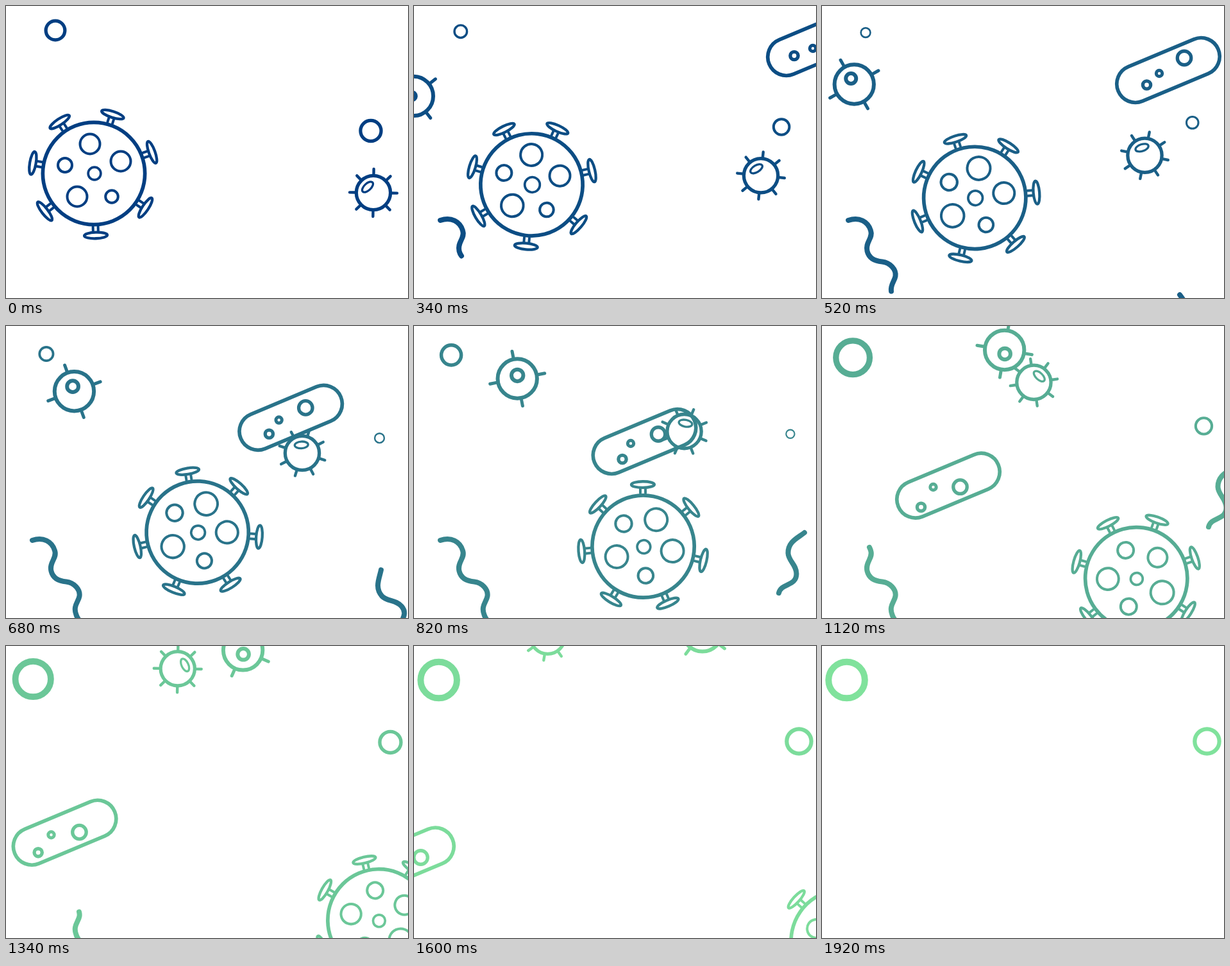
Animation of 627 by 455 pixels, one loop 2000 ms. Source, as an HTML page with a canvas:

```html
<!DOCTYPE html>
<html lang="en">
<head>
<meta charset="utf-8">
<title>Drifting microbes</title>
<style>
html, body { margin: 0; width: 627px; height: 455px; overflow: hidden; background: #fff; }
canvas { display: block; }
</style>
</head>
<body>
<canvas id="stage" width="627" height="455"></canvas>
<script>
const ctx = document.getElementById('stage').getContext('2d');
const RAD = Math.PI / 180;
const KEYS = [0, 340, 520, 820, 1120, 1600, 1920];
let t = 0;

// Eased progress from 0 to 1 over a duration
function ease(duration) {
  const s = Math.min(t / duration, 1);
  return s * s * (3 - 2 * s);
}

const mix = (a, b, p) => a + (b - a) * p;

// Monotone cubic through values at KEYS; the last value is held
function key(...v) {
  const at = i => v[Math.min(i, v.length - 1)];
  const rise = i => (at(i + 1) - at(i)) / (KEYS[i + 1] - KEYS[i]);
  const slope = i => {
    if (i === 0 || i === KEYS.length - 1) return 0;
    const a = rise(i - 1), b = rise(i);
    return a * b <= 0 ? 0 : 2 * a * b / (a + b);
  };
  let i = 0;
  while (i < KEYS.length - 2 && t >= KEYS[i + 1]) i++;
  const h = KEYS[i + 1] - KEYS[i], s = (t - KEYS[i]) / h, r = 1 - s;
  return at(i) * r * r * (1 + 2 * s) + at(i + 1) * s * s * (3 - 2 * s)
    + h * s * r * (slope(i) * r - slope(i + 1) * s);
}

function group(x, y, deg, draw) {
  ctx.save();
  ctx.translate(x, y);
  ctx.rotate(deg * RAD);
  draw();
  ctx.restore();
}

function ellipse(x, y, rx, ry, width, tilt = 0) {
  ctx.lineWidth = width;
  ctx.beginPath();
  ctx.ellipse(x, y, rx, ry, tilt * RAD, 0, 2 * Math.PI);
  ctx.stroke();
}

// Circle measured by its outer edge
const ring = (x, y, outer, width) =>
  ellipse(x, y, outer - width / 2, outer - width / 2, width);

function line(x1, y1, x2, y2, width) {
  ctx.lineWidth = width;
  ctx.beginPath();
  ctx.moveTo(x1, y1);
  ctx.lineTo(x2, y2);
  ctx.stroke();
}

function spikes(count, from, to, width) {
  for (let i = 0; i < count; i++)
    group(0, 0, i * 360 / count, () => line(from, 0, to, 0, width));
}

function bigVirus() {
  const p = ease(1960);
  group(137 + 582.5 * p, 261 + 218 * p, 87.5 * p, () => {
    ring(0, 0, 82.5, 5.7);
    for (const a of [33.5, 88.2, 142.5, 189.7, 236.5, 287.7, 339.9])
      group(0, 0, a, () => {
        line(83, -4, 90, -4, 4);
        line(83, 4, 90, 4, 4);
        ellipse(96.5, 0, 4.8, 18, 4.3);
      });
    ring(-6, -46, key(17.5, 19, 20, 19.5, 17), 4);
    ring(42, -19, key(17.5, 18, 18.5, 19.5, 20), 4);
    ring(-45, -13, key(13, 14, 14.7, 14.7, 14.5), 4);
    ring(1, 0, key(11.7, 13.7, 13.2, 12.2, 11.3), 3.7);
    ring(-26, 36, key(17.5, 19.3, 19.8, 19.5, 18.9, 16.5), 4);
    ring(28, 36, key(11.8, 12.8, 13.3, 13.8, 14.5), 4);
  });
}

function smallVirus() {
  const p = ease(1960);
  group(573 - 400 * p, 291 - 335 * p, 0, () => {
    ring(0, 0, 29.3, 5.3);
    group(0, 0, 1 + 59 * p, () => spikes(8, 29, 37, 4.4));
    group(0, 0, 142 * p, () => ellipse(-9, -9, 10.5, 5.3, 3.3, -43));
  });
}

function eyedVirus() {
  const p = ease(1960);
  group(-44 + 542 * p, 156 - 195.5 * p, 0, () => {
    ring(0, 0, 33.7, 6);
    group(0, 0, -45 + 90 * p, () => spikes(4, 34, 43.3, 5));
    ring(key(-2, -2.5, -5, 0, 0.5), key(4, 0, -9, -5, 6), key(8, 9, 11, 12.2, 11.8), 6);
  });
}

function capsule() {
  const x = key(734, 632, 540, 359.5, 197, -18, -120);
  const y = key(12, 58, 100, 180, 248.7, 333.5, 373);
  group(x, y, 0, () => {
    group(0, 0, -22.7, () => {
      ctx.lineWidth = 5.7;
      ctx.beginPath();
      ctx.roundRect(-84.5, -29, 169, 58, 29);
      ctx.stroke();
    });
    ring(key(28, 27, 25, 21.5, 18.5, 28.5), key(-23, -22, -19, -11.5, 2, -4), 13.4, 5.3);
    ring(key(-8, -10, -14, -21.5, -23.5, -18), key(9, 8, 5, 3, 2.3, 5), 7.2, 5);
    ring(key(-40, -39, -33.5, -34.5, -42.5, -40), key(18, 19.5, 23, 27.5, 33.5, 28), 8.8, 5.4);
  });
}

function bubbles() {
  const a = ease(1660), b = ease(1500);
  const left = key(17.5, 11.5, 8.7, 18.3, 31, 33.3);
  const right = key(18.7, 14.3, 10.8, 7.7, 14.7, 22.3);
  ring(77 - 38.5 * a, 38 + 15 * a, left, left * 0.3);
  ring(569 + 31.5 * b, 194.5 - 46 * b, right, right * 0.28);
}

const leftWorm = new Path2D('M41 334C58 328 72 336 76 350C80 362 67 368 70.5 382' +
  'C74 396 88 398 94 398.5C106 400 116 410 114.5 421C113 430 104 436 109.5 450C114 464 128 468 140 470');
const rightWorm = new Path2D('M0 0C-10 8-26 14-25.5 32C-25 44-12.5 50-12.5 64C-12.5 84-36 78-40 94');

function worms() {
  ctx.lineWidth = 8;
  const start = key(0, 0, 0, 0, 38, 230), end = key(0, 85, 166, 230);
  if (end - start > 0.5) {
    ctx.setLineDash([end - start, 1000]);
    ctx.lineDashOffset = -start;
    ctx.stroke(leftWorm);
    ctx.setLineDash([]);
  }
  group(key(530, 540, 558, 609, 643, 700), key(620, 525, 450, 322, 219, 60),
    key(-90, -90, -90, 0), () => ctx.stroke(rightWorm));
}

function frame(now) {
  t = Math.min(Math.floor(now % 2000 / 20) * 20, 1920);
  const p = ease(1800);
  const rgb = [mix(0, 128, p), mix(62, 226, p), mix(130, 156, p)].map(Math.round);
  ctx.clearRect(0, 0, 627, 455);
  ctx.strokeStyle = `rgb(${rgb})`;
  ctx.lineCap = 'round';
  bubbles();
  worms();
  capsule();
  eyedVirus();
  smallVirus();
  bigVirus();
}

const begin = performance.now();
function loop() {
  frame(performance.now() - begin);
  requestAnimationFrame(loop);
}
loop();
</script>
</body>
</html>
```
